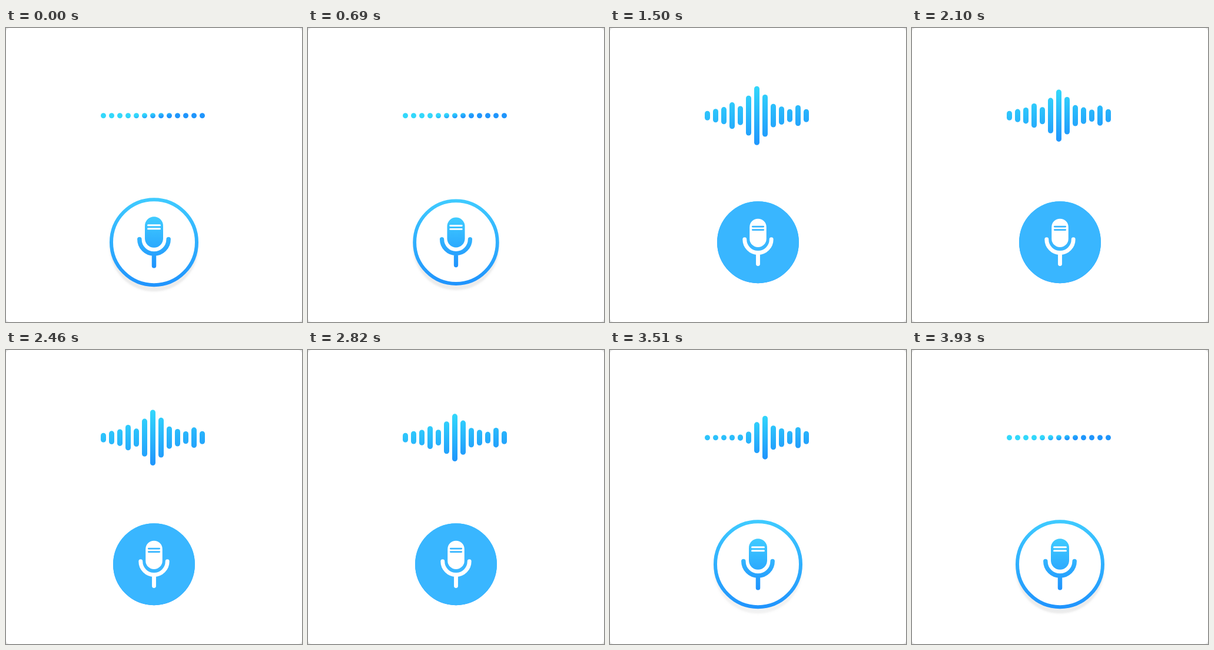
An HTML page with a canvas for the animation above (4110 ms loop, 503 by 499 pixels).

```html
<!DOCTYPE html>
<html lang="en">
<head>
<meta charset="utf-8">
<title>Voice button</title>
<style>
  html, body { margin: 0; width: 100%; height: 100%; overflow: hidden; background: #e8e8e8; }
  canvas { display: block; }
</style>
</head>
<body>
<canvas width="503" height="499"></canvas>
<script>
const ctx = document.querySelector('canvas').getContext('2d');
const LOOP = 4110, STEP = 30;
const BLUE = '#39b6ff';
const BAR = { x: 161, y: 148.7, width: 9, pitch: 14 };
const PROFILE = [16, 22.5, 28, 42.5, 30, 62.5, 92, 66, 37, 29, 21, 34.5, 22];
const LAST = PROFILE.length - 1;
const STAGGER = 30, RISE_AT = 810, FALL_AT = 3300;
// Times at which the loudness turns: quiet, loud, quiet, loud, ...
const TURNS = [1200, 1600, 2020, 2220, 2780, 3360];

const mix = (a, b, k) => a + (b - a) * k;
const progress = (t, start, end) => Math.min(1, Math.max(0, (t - start) / (end - start)));
const easeOut = (k, power) => 1 - (1 - k) ** power;

// Swings smoothly between -1 and 1, half a cosine wave per turn.
function loudness(t) {
  let halfWaves = 0;
  for (let i = 1; i < TURNS.length; i++) halfWaves += progress(t, TURNS[i - 1], TURNS[i]);
  return -Math.cos(Math.PI * halfWaves);
}

function barHeight(i, t) {
  const delay = i * STAGGER;
  const rise = easeOut(progress(t, RISE_AT + delay, RISE_AT + delay + 240), 3);
  const fall = easeOut(progress(t, FALL_AT + delay, FALL_AT + delay + 210), 5);
  const swing = 0.125 * Math.sin(Math.PI * i / LAST);
  return mix(BAR.width, PROFILE[i] * (1 + swing * loudness(t)), rise * (1 - fall));
}

function pill(x, y, w, h) {
  ctx.beginPath();
  ctx.roundRect(x, y, w, h, Math.min(w, h) / 2);
  ctx.fill();
}

function gradient(x0, y0, x1, y1, from, to) {
  const g = ctx.createLinearGradient(x0, y0, x1, y1);
  g.addColorStop(0, from);
  g.addColorStop(1, to);
  return g;
}

const skyGradient = (top, bottom) => gradient(0, top, 0, bottom, '#3fcbff', '#1f93fd');

function drawBars(t) {
  const heights = PROFILE.map((_, i) => barHeight(i, t));
  // Slightly tilted gradient that spans the tallest bar.
  const tilt = 0.16, half = Math.max(...heights) / 2 / (1 + tilt * tilt);
  const cx = BAR.x + (BAR.pitch * LAST + BAR.width) / 2;
  ctx.fillStyle = gradient(cx - half * tilt, BAR.y - half, cx + half * tilt, BAR.y + half, '#33d8fb', '#1f95fc');
  heights.forEach((h, i) => pill(BAR.x + i * BAR.pitch, BAR.y - h / 2, BAR.width, h));
}

function disc(radius) {
  ctx.beginPath();
  ctx.arc(0, 0, radius, 0, 2 * Math.PI);
}

function drawMic(paint, slots) {
  ctx.fillStyle = ctx.strokeStyle = paint;
  pill(-15.5, -43.5, 31, 52.5);
  ctx.lineWidth = 7.5;
  ctx.lineCap = 'round';
  ctx.beginPath();
  ctx.arc(0, -5.3, 24.7, Math.PI, 0, true);
  ctx.moveTo(0, 20);
  ctx.lineTo(0, 40);
  ctx.stroke();
  ctx.fillStyle = slots;
  for (const y of [-30.5, -24.5]) pill(-11.5, y, 23, 3);
}

function drawButton(t) {
  const press = progress(t, 660, 740) - easeOut(progress(t, 3300, 3420), 3);
  const filled = progress(t, 690, 750) - progress(t, 3300, 3420);
  const shadow = 1 - progress(t, 690, 750) + easeOut(progress(t, 3330, 3930), 3);
  const scale = 1 - 0.08 * press;
  ctx.save();
  ctx.translate(251.5, 363.7);
  ctx.scale(scale, scale);

  ctx.save();
  ctx.shadowColor = `rgba(0,0,0,${0.075 * shadow})`;
  ctx.shadowOffsetY = 8.5;
  ctx.shadowBlur = 3;
  ctx.fillStyle = '#fff';
  disc(75);
  ctx.fill();
  ctx.restore();

  ctx.strokeStyle = skyGradient(-75.5, 75.5);
  ctx.lineWidth = 6;
  disc(72.5);
  ctx.stroke();
  drawMic(skyGradient(-43.5, 43.5), '#fff');

  if (filled > 0) {
    ctx.globalAlpha = filled;
    ctx.fillStyle = BLUE;
    disc(75.5);
    ctx.fill();
    drawMic('#fff', BLUE);
  }
  ctx.restore();
}

function draw(now) {
  const t = Math.floor((now % LOOP) / STEP) * STEP;
  ctx.clearRect(0, 0, 503, 499);
  ctx.fillStyle = '#fff';
  ctx.beginPath();
  ctx.roundRect(0, 0, 503, 499, 6);
  ctx.fill();
  drawBars(t);
  drawButton(t);
}

const start = performance.now();
function frame() {
  draw(performance.now() - start);
  requestAnimationFrame(frame);
}
frame();
</script>
</body>
</html>
```
